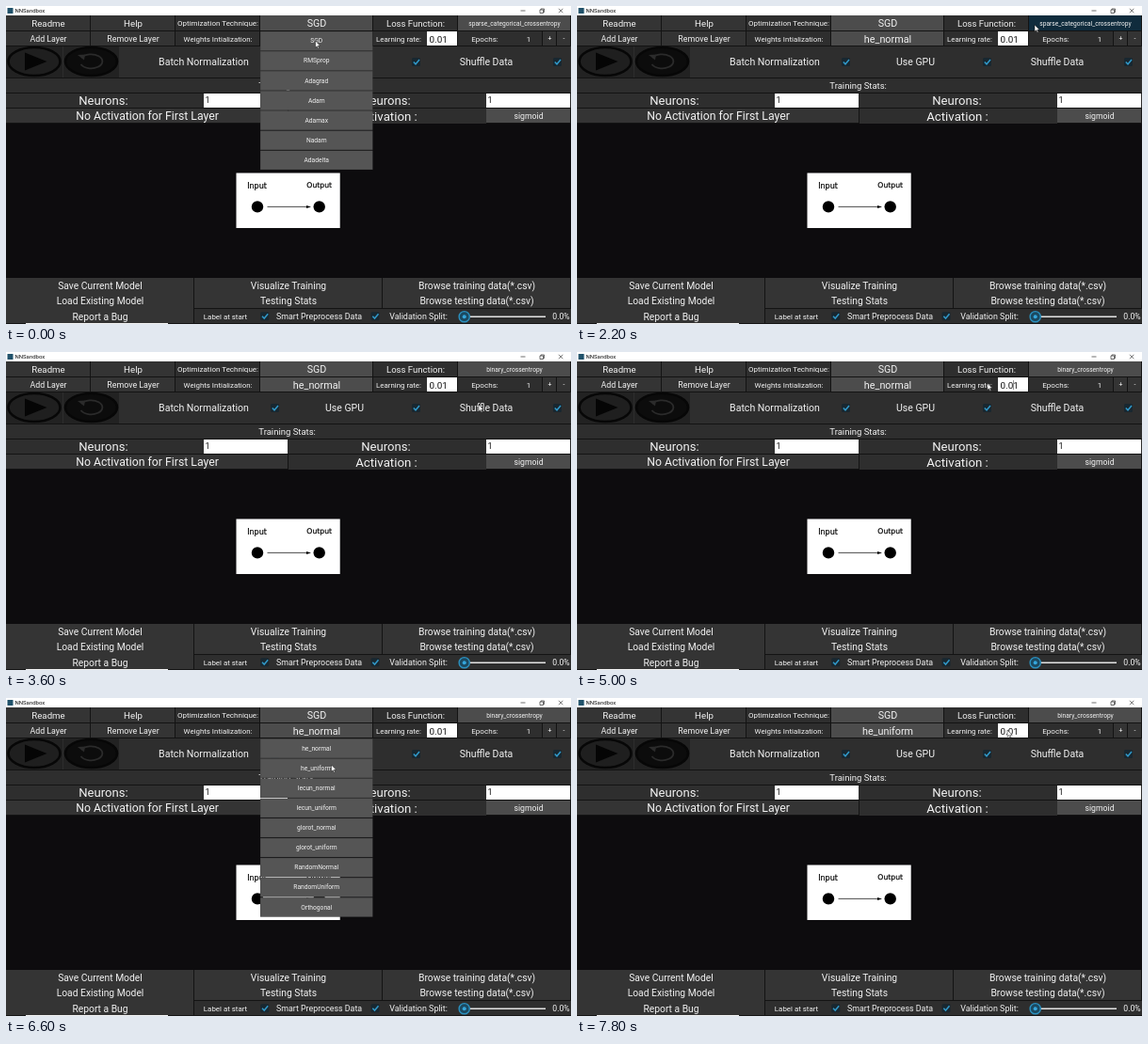
Recreate the animation shown at these times as an HTML page. Size 600 by 338 pixels, loop 8 s.

```html
<!DOCTYPE html>
<html lang="en">
<head>
<meta charset="utf-8">
<title>Network sandbox</title>
<style>
html, body { margin: 0; width: 100%; height: 100%; overflow: hidden; background: #0d0c0e; }
svg { display: block; width: 100vw; height: 100vh; }
text { font-family: Roboto, sans-serif; fill: #f2f2f2; }
.plot text { font-family: "DejaVu Sans", sans-serif; fill: #000; stroke: #000; stroke-width: 0.2px; }
</style>
</head>
<body>
<svg id="stage" viewBox="0 0 600 338"></svg>
<script>
const LOOP = 8000, STEP = 200;
const BG = '#2e2e2e', BUTTON = '#343434', SPINNER = '#4c4c4c', HOVER = '#102c3d', LINE = '#131313';
const stage = document.getElementById('stage');

function add(tag, attrs, parent = stage) {
  const node = document.createElementNS('http://www.w3.org/2000/svg', tag);
  for (const key in attrs) node.setAttribute(key, attrs[key]);
  return parent.appendChild(node);
}
const rect = (x, y, width, height, fill, parent) => add('rect', { x, y, width, height, fill }, parent);
const path = (d, attrs, parent) => add('path', { d, fill: 'none', ...attrs }, parent);

// Places text with its capitals centred on cy.
function label(str, x, cy, size, { anchor = 'middle', fill, parent } = {}) {
  const node = add('text', { x, y: cy + size * 0.355, 'font-size': size, 'text-anchor': anchor }, parent);
  if (fill) node.style.fill = fill;
  node.textContent = str;
  return node;
}

function cell(x, y, w, h, fill, str, size) {
  rect(x, y, w, h, LINE);
  const face = rect(x, y, w - 1, h - 1, fill);
  const text = str ? label(str, x + w / 2, y + h / 2, size) : null;
  return { face, text };
}

function checkbox(x, y) {
  add('rect', { x: x - 4.5, y: y - 4.5, width: 9, height: 9, rx: 1.5, fill: '#182730' });
  path(`M${x - 2.7} ${y}l2.2 2.3 4-4.8`, { stroke: '#3199c9', 'stroke-width': 1.5 });
}

function menu(x, y, width, items) {
  const group = add('g', {});
  items.forEach((item, i) => {
    const top = y + i * 21.1;
    rect(x, top, width, 20.4, '#444', group);
    rect(x + 0.5, top + 0.4, width - 1, 19.6, '#555', group);
    label(item, x + width / 2, top + 10, 6.7, { parent: group });
  });
  return group;
}

// Title bar
rect(0, 0, 600, 10, '#fff');
rect(1.5, 2, 6, 6, '#21526b');
label('NNSandbox', 9.5, 5, 6, { anchor: 'start', fill: '#111' });
path('M546.5 5h5M567 4h3.5v3.5h-3.5zM568 4v-1h3.5v3.5h-1M587 2.8l4.4 4.4M591.4 2.8l-4.4 4.4',
  { stroke: '#333', 'stroke-width': 0.7 });

// Settings rows
rect(0, 10, 600, 115, BG);
cell(0, 10, 90, 17, BUTTON, 'Readme', 9.7);
cell(90, 10, 90, 17, BUTTON, 'Help', 9.7);
cell(180, 10, 90, 17, BG, 'Optimization Technique:', 8);
cell(270, 10, 120, 17, SPINNER, 'SGD', 10.7);
cell(390, 10, 90, 17, BG, 'Loss Function:', 9.55);
const loss = cell(480, 10, 120, 17, SPINNER, ' ', 6.65);
cell(0, 27, 90, 16, BUTTON, 'Add Layer', 8.8);
cell(90, 27, 90, 16, BUTTON, 'Remove Layer', 8.85);
cell(180, 27, 90, 16, BG, 'Weights Intialization:', 7.9);
const weights = cell(270, 27, 120, 16, SPINNER, ' ', 10.8);
cell(390, 27, 90, 16, BG);
label('Learning rate:', 393, 35, 7.9, { anchor: 'start' });
rect(447, 27, 32, 15, '#fff');
label('0.01', 449.5, 35.5, 9.9, { anchor: 'start', fill: '#111' });
const caret = rect(463, 30, 0.8, 10, '#777');
cell(480, 27, 90, 16, BG);
label('Epochs:', 508.5, 35, 8.1);
label('1', 555, 35, 8);
cell(570, 27, 15, 16, BUTTON, '+', 7);
cell(585, 27, 15, 16, BUTTON, '-', 7);

// Play and reset buttons
rect(0, 43, 60, 33, '#222');
rect(61, 43, 59, 33, '#222');
const disc = (cx, fill) =>
  add('ellipse', { cx, cy: 59, rx: 27.5, ry: 15, fill, stroke: '#070707', 'stroke-width': 2.6 });
disc(30, '#1f1f1f');
path('M20 49.5L43.5 59 20 68.5z', { fill: '#050505' });
disc(90.5, '#0c0c0c');
path('M80 55A12 7.5 0 1 1 79.5 62', { stroke: '#2b2b2b', 'stroke-width': 1.8 });
path('M76 52l8-0.5-1 6z', { fill: '#2b2b2b' });

label('Batch Normalization', 210, 59.5, 10.55);
label('Use GPU', 359.5, 59.5, 10.5);
label('Shuffle Data', 510, 59.5, 10.5);
[285.5, 435.5, 585.5].forEach(x => checkbox(x, 59.5));

rect(0, 76, 600, 1, LINE);
label('Training Stats:', 298.6, 84.3, 9.5);
rect(0, 92, 600, 1, LINE);
for (const x of [0, 300]) {
  label('Neurons:', x + 103.5, 100.3, 13.1);
  rect(x + 210, 93, 89, 15, '#fff');
  label('1', x + 211.5, 100, 9, { anchor: 'start', fill: '#111' });
}
rect(0, 108, 600, 1, LINE);
cell(0, 109, 300, 16, BUTTON);
label('No Activation for First Layer', 150, 117, 12.25);
label('Activation :', 404, 117, 13.25);
cell(510, 109, 90, 16, SPINNER, 'sigmoid', 8.7);

// Network diagram
const plot = add('g', { class: 'plot' });
rect(244.5, 177.5, 110.2, 58.5, '#fff', plot);
label('Input', 266.5, 190.7, 8, { parent: plot });
label('Output', 332.7, 190.7, 7.7, { parent: plot });
for (const cx of [267, 332.7]) add('circle', { cx, cy: 213.4, r: 6.2 }, plot);
path('M277.5 213.4H320', { stroke: '#000', 'stroke-width': 0.7 }, plot);
path('M319 211.9l5 1.5-5 1.5z', { fill: '#000' }, plot);

// Bottom rows
const bottom = [
  ['Save Current Model', 'Visualize Training', 'Browse training data(*.csv)'],
  ['Load Existing Model', 'Testing Stats', 'Browse testing data(*.csv)'],
];
bottom.forEach((row, r) => row.forEach((str, c) => cell(c * 200, 289 + r * 16, 200, 17, BUTTON, str, 10.3)));
cell(0, 321, 200, 17, BUTTON);
label('Report a Bug', 100, 330.2, 10.3);
rect(200, 322, 400, 15, BG);
rect(0, 337, 600, 1, '#151515');
rect(21, 337, 151, 1, '#f4f4f4');
label('Label at start', 233, 330.2, 7.9);
checkbox(274.7, 329.8);
label('Smart Preprocess Data', 332.5, 330.2, 8.85);
checkbox(392, 329.8);
label('Validation Split:', 438, 330.2, 8.95);
rect(487, 329.5, 86, 1.5, '#e4e4e4');
add('circle', { cx: 486.7, cy: 330.2, r: 5.6, fill: '#1c4960', stroke: '#2b91c0', 'stroke-width': 1.4 });
add('circle', { cx: 486.7, cy: 330.2, r: 2, fill: '#35a6dc' });
label('0.0%', 589.5, 330.2, 8.7);

const optimizerMenu = menu(270, 27, 119.5,
  ['SGD', 'RMSprop', 'Adagrad', 'Adam', 'Adamax', 'Nadam', 'Adadelta']);
const lossMenu = menu(480, 27, 119.5,
  ['sparse_categorical_crossentropy', 'binary_crossentropy', 'categorical_crossentropy', 'mean_squared_error',
   'mean_absolute_error', 'squared_hinge', 'hinge', 'poisson']);
const weightsMenu = menu(270, 43.4, 119.5,
  ['he_normal', 'he_uniform', 'lecun_normal', 'lecun_uniform', 'glorot_normal', 'glorot_uniform',
   'RandomNormal', 'RandomUniform', 'Orthogonal']);

const cursor = path('M0 0V7.2L1.7 5.7 2.8 8.2 3.9 7.7 2.8 5.3H5.1z',
  { fill: '#fff', stroke: '#111', 'stroke-width': 0.5 });

// Pointer stops: time, x, y
const stops = [
  [0, 328.5, 37], [1000, 354, 36], [1200, 354, 36], [1400, 358.3, 34], [1600, 362, 33],
  [2200, 486, 20], [2400, 486, 21], [3200, 501, 56], [3400, 501, 56], [3600, 502, 56],
  [4600, 461, 34], [4800, 461, 34], [5600, 360.5, 31], [6000, 360.5, 31], [6200, 358, 36],
  [6600, 345.5, 71], [7000, 346, 70], [7800, 457, 34], [LOOP, 457, 34],
];

function pointerAt(t) {
  const i = stops.findIndex(stop => stop[0] > t);
  const [t0, x0, y0] = stops[i - 1], [t1, x1, y1] = stops[i];
  const k = (t - t0) / (t1 - t0);
  return [x0 + (x1 - x0) * k, y0 + (y1 - y0) * k];
}

const show = (node, on) => node.setAttribute('visibility', on ? 'visible' : 'hidden');

function render(now) {
  const t = Math.floor(now % LOOP / STEP) * STEP;
  const during = (from, to) => t >= from && t < to;
  show(optimizerMenu, during(0, 1600));
  show(lossMenu, during(2400, 3600));
  show(weightsMenu, during(6200, 7200));
  show(caret, during(4600, 6200));
  loss.text.textContent = t < 3600 ? 'sparse_categorical_crossentropy' : 'binary_crossentropy';
  loss.face.setAttribute('fill', during(2200, 2400) ? HOVER : SPINNER);
  weights.text.textContent = t < 7200 ? 'he_normal' : 'he_uniform';
  weights.face.setAttribute('fill', during(6000, 6200) ? HOVER : SPINNER);
  cursor.setAttribute('transform', `translate(${pointerAt(t)})`);
}

const start = performance.now();
function tick() {
  render(performance.now() - start);
  requestAnimationFrame(tick);
}
tick();
</script>
</body>
</html>
```
